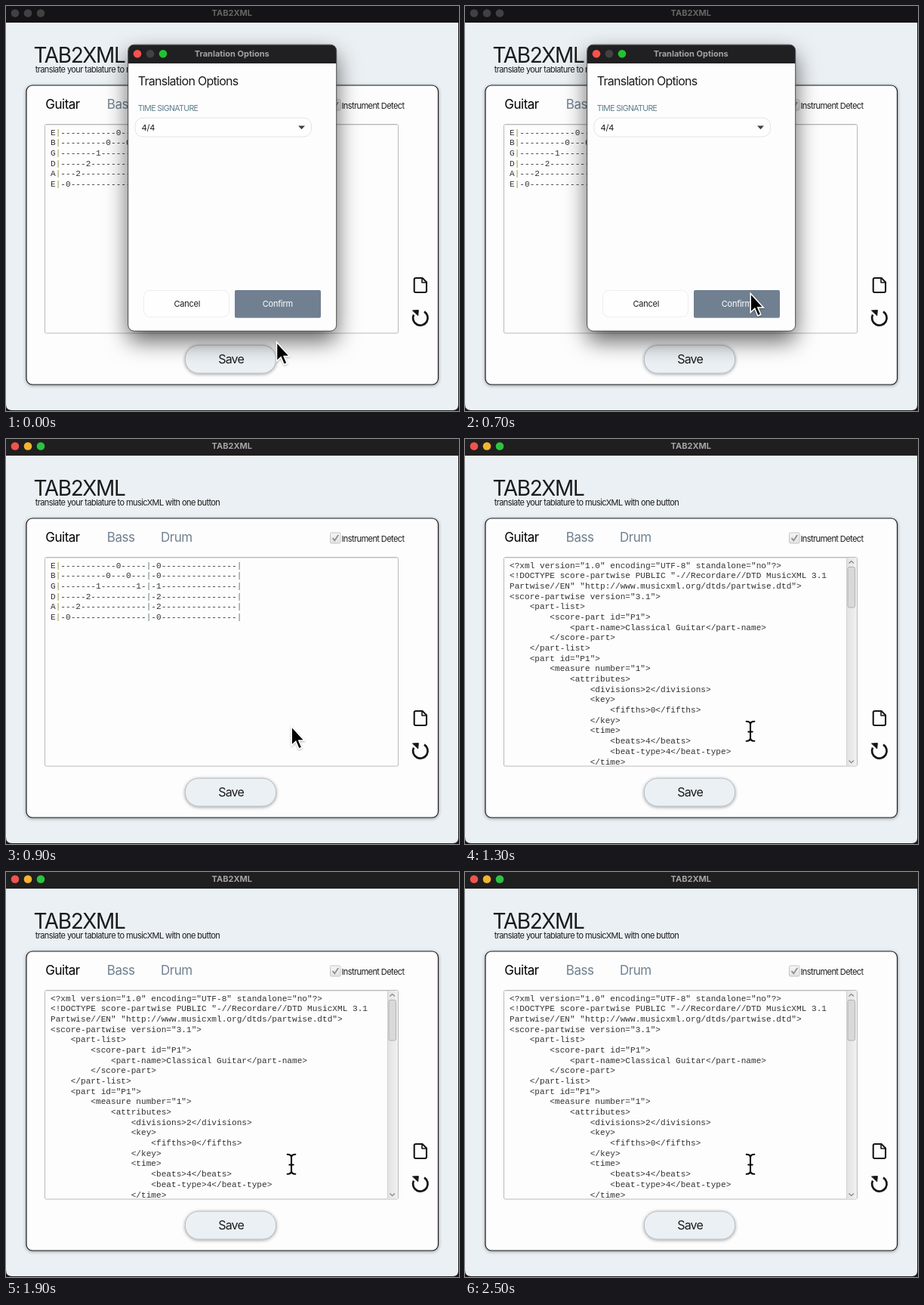
Recreate the animation shown at these times as an HTML page. Size 600 by 536 pixels, loop 2.6 s.

```html
<!DOCTYPE html>
<html lang="en">
<head>
<meta charset="utf-8">
<title>TAB2XML</title>
<style>
  html, body { margin: 0; width: 100%; height: 100%; overflow: hidden; background: #1b1a1b; }
  svg { display: block; width: 100vw; height: 100vh; }
  text { font-family: Inter, "Open Sans", sans-serif; fill: #1a1b1c; white-space: pre; }
  .bar { font-size: 11px; font-weight: 700; text-anchor: middle; fill: #a5a3a5; }
  .title { font-size: 28px; letter-spacing: -1.4px; }
  .small { font-size: 11px; letter-spacing: -.58px; }
  .tab { font-size: 17px; letter-spacing: -.5px; }
  .head { font-size: 16px; letter-spacing: -.72px; }
  .label { font-size: 10.5px; letter-spacing: -.58px; fill: #5d7c89; }
  .button { font-size: 11px; letter-spacing: -.25px; }
  .muted { fill: #708090; }
  .code text { font: 11.11px "Liberation Mono", "Courier New", monospace; fill: #333; }
</style>
</head>
<body>
<svg viewBox="0 0 600 536" preserveAspectRatio="none">
  <defs>
    <filter id="deep" x="-40%" y="-30%" width="180%" height="170%">
      <feDropShadow dx="0" dy="13" stdDeviation="15" flood-color="#000" flood-opacity=".62"/>
    </filter>
    <filter id="soft" x="-20%" y="-30%" width="140%" height="170%">
      <feDropShadow dx="0" dy="1" stdDeviation="2.2" flood-color="#000" flood-opacity=".38"/>
    </filter>
    <filter id="tiny" x="-30%" y="-30%" width="170%" height="170%">
      <feDropShadow dx="0" dy="1" stdDeviation="1" flood-color="#000" flood-opacity=".35"/>
    </filter>
    <linearGradient id="check" x1="0" y1="0" x2="0" y2="1">
      <stop offset="0" stop-color="#f6f6f6"/><stop offset="1" stop-color="#e2e2e3"/>
    </linearGradient>
    <linearGradient id="track">
      <stop offset="0" stop-color="#e2e2e3"/><stop offset="1" stop-color="#f0f0f1"/>
    </linearGradient>
    <clipPath id="pane"><rect x="52" y="157" width="467" height="275"/></clipPath>
  </defs>

  <!-- main window -->
  <rect width="600" height="536" fill="#1b1a1b"/>
  <path d="M0 21H599V528Q599 535 592 535H8Q0 535 0 527Z" fill="#ebf0f4"/>
  <rect id="topbar" width="600" height="22"/>
  <g id="lights"></g>
  <text id="caption" class="bar" x="299.3" y="13">TAB2XML</text>

  <text class="title" x="36.5" y="74.5">TAB2XML</text>
  <text class="small" x="38.7" y="88">translate your tablature to musicXML with one button</text>

  <rect x="27" y="105" width="545.5" height="396" rx="8" fill="#fdfdfe" stroke="#1d1f21" stroke-width="1.2" filter="url(#soft)"/>
  <text class="tab" x="52.3" y="136.3" style="fill:#000">Guitar</text>
  <text class="tab muted" x="133.8" y="136.3">Bass</text>
  <text class="tab muted" x="205" y="136.3">Drum</text>
  <rect x="429.5" y="124" width="13.5" height="14" rx="1.5" fill="url(#check)" stroke="#c3c4c5"/>
  <path d="M432.5 131L435.3 134.4L440.2 127" fill="none" stroke="#898a8b" stroke-width="1.7"/>
  <text class="small" x="444.5" y="136">Instrument Detect</text>

  <rect x="51.5" y="156.5" width="468" height="276.5" rx="2" fill="#fdfdfe" stroke="#b9babb"/>
  <path d="M52 157.5H519" stroke="#dfe0e1"/>
  <g class="code" clip-path="url(#pane)">
    <g id="tablature"></g>
    <g id="xml"></g>
  </g>
  <g id="scrollbar">
    <rect x="505" y="157" width="14" height="275.5" fill="url(#track)"/>
    <path d="M505.5 157V432" stroke="#d0d0d1"/>
    <rect x="507" y="169.5" width="9.5" height="53.5" rx="2" fill="#d9d9da" stroke="#b2b2b3"/>
    <path d="M508.5 164.5L511.7 161.5L515 164.5M508.5 425.5L511.7 428.5L515 425.5" fill="none" stroke="#858586" stroke-width="1.2"/>
  </g>

  <g fill="none" stroke="#151515" stroke-width="2.1" stroke-linejoin="round">
    <path d="M543 360H551.5L557 365.5V377Q557 379 555 379H542.7Q540.7 379 540.7 377V362Q540.7 360 543 360Z"/>
    <path d="M551 360.5V366H556.5" stroke-width="1.6"/>
    <path d="M554 404.5A9.8 9.8 0 1 1 540 408.5" stroke-width="2.7"/>
    <path d="M538.5 403L546.3 402.6L545.7 409.8Z" fill="#151515" stroke-width="1"/>
  </g>

  <rect x="237.3" y="449" width="120.4" height="37" rx="18" fill="#ebf0f4" stroke="#b4b9bd" filter="url(#soft)"/>
  <text class="head" x="281.2" y="473" style="letter-spacing:-.8px">Save</text>

  <!-- options dialog -->
  <g id="dialog">
    <rect x="162" y="51.5" width="275.5" height="378.5" rx="8" fill="#fdfdfe" filter="url(#deep)"/>
    <path d="M162 76V59.5Q162 51.5 170 51.5H429.5Q437.5 51.5 437.5 59.5V76Z" fill="#201f21"/>
    <rect x="161.7" y="51.2" width="276" height="379" rx="8" fill="none" stroke="#3b3c3e" stroke-width=".9"/>
    <circle cx="174" cy="63.3" r="5.3" fill="#fb514d"/>
    <circle cx="191" cy="63.3" r="5.3" fill="#434144"/>
    <circle cx="208" cy="63.3" r="5.3" fill="#22c232"/>
    <text class="bar" x="299.2" y="67">Tranlation Options</text>
    <text class="head" x="174.7" y="104.7">Translation Options</text>
    <text class="label" x="174.8" y="138.5">TIME SIGNATURE</text>
    <rect x="171" y="148" width="233.5" height="25" rx="10" fill="#fefefe" stroke="#e0e5e9"/>
    <text class="button" x="179.6" y="164.5">4/4</text>
    <path d="M387 158.5H396L391.5 163.3Z" fill="#3f4041"/>
    <rect x="182.5" y="376.5" width="113" height="35" rx="8" fill="#fefefe" stroke="#ebeef1"/>
    <text class="button" x="222.5" y="398">Cancel</text>
    <rect x="303" y="376" width="114" height="36.7" rx="2" fill="#708090"/>
    <text class="button" x="339.8" y="398" style="fill:#fff">Confirm</text>
  </g>

  <g id="arrow" filter="url(#tiny)">
    <path d="M0 0V25L5.6 19.8L9.7 29.5L13.6 27.8L9.6 18.4H17Z" fill="#050505" stroke="#fff" stroke-width="1.5"/>
  </g>
  <g id="beam" fill="none" stroke-linecap="round">
    <path id="halo" d="M372.7 373.8Q378 373.8 378 378V395.5Q378 399.7 372.7 399.7M383.3 373.8Q378 373.8 378 378M378 395.5Q378 399.7 383.3 399.7M375.3 387.5H380.7" stroke="#fff" stroke-width="4"/>
    <use href="#halo" id="ink"/>
  </g>
</svg>
<script>
const LOOP = 2600, STEP = 100, CLOSE = 800, RESULT = 1000;
const $ = id => document.getElementById(id);

function add(parent, name, attrs, content = "") {
  const el = document.createElementNS("http://www.w3.org/2000/svg", name);
  for (const key in attrs) el.setAttribute(key, attrs[key]);
  el.textContent = content;
  return parent.appendChild(el);
}

const lineY = i => 170.6 + i * 13.68;
const LEFT = 59, CHAR = 6.667;

// string name, fret positions in the first bar, closing chord
const strings = [
  ["E", { 11: 0 }, 0], ["B", { 9: 0, 13: 0 }, 0], ["G", { 7: 1, 15: 1 }, 1],
  ["D", { 5: 2 }, 2], ["A", { 3: 2 }, 2], ["E", { 1: 0 }, 0]
];
strings.forEach(([name, notes, chord], i) => {
  const bar = Array.from({ length: 17 }, (_, k) => notes[k] ?? "-").join("");
  const y = lineY(i);
  const put = (col, s, fill) =>
    add($("tablature"), "text", { x: LEFT + col * CHAR, y, style: fill ? `fill:${fill}` : "" }, s);
  put(0, name);
  put(1, "|", "#98933a");
  put(2, bar);
  put(19, "|", "#587564");
  put(20, "-" + chord + "-".repeat(15));
  put(37, "|", "#666");
});

const xmlLines = `<?xml version="1.0" encoding="UTF-8" standalone="no"?>
<!DOCTYPE score-partwise PUBLIC "-//Recordare//DTD MusicXML 3.1
Partwise//EN" "http://www.musicxml.org/dtds/partwise.dtd">
<score-partwise version="3.1">
    <part-list>
        <score-part id="P1">
            <part-name>Classical Guitar</part-name>
        </score-part>
    </part-list>
    <part id="P1">
        <measure number="1">
            <attributes>
                <divisions>2</divisions>
                <key>
                    <fifths>0</fifths>
                </key>
                <time>
                    <beats>4</beats>
                    <beat-type>4</beat-type>
                </time>`.split("\n");
xmlLines.forEach((line, i) => {
  const code = line.trimStart();
  add($("xml"), "text", { x: LEFT + (line.length - code.length) * CHAR, y: lineY(i) }, code);
});

const lights = ["#ef5450", "#f4b42f", "#2bc440"].map((color, i) =>
  ({ color, el: add($("lights"), "circle", { cx: 12 + 17 * i, cy: 9.5, r: 5.3 }) }));

// <use> inherits only what its path leaves unset, so the ink is a recoloured copy
const ink = $("halo").cloneNode();
ink.removeAttribute("id");
ink.setAttribute("stroke", "#080808");
ink.setAttribute("stroke-width", "2.1");
$("ink").replaceWith(ink);

const show = (id, on) => $(id).setAttribute("display", on ? "inline" : "none");

function draw(ms) {
  const t = Math.floor((ms % LOOP) / STEP) * STEP;
  const open = t < CLOSE, done = t >= RESULT;

  show("dialog", open);
  show("tablature", !done);
  show("xml", done);
  show("scrollbar", done);
  show("arrow", !done);
  show("beam", done);

  $("topbar").setAttribute("fill", open ? "#141315" : "#201f20");
  $("caption").style.fill = open ? "#666467" : "#a5a3a5";
  lights.forEach(({ el, color }) => el.setAttribute("fill", open ? "#414043" : color));

  const p = Math.min(t / 400, 1), ease = 1 - (1 - p) ** 2;
  const x = 358.5 + 20.5 * ease - (t >= 700 ? 0.8 : 0);
  const y = 445 - 65 * ease + (t >= 700 ? 0.5 : 0);
  $("arrow").setAttribute("transform", `translate(${x} ${y})`);
}

const start = performance.now();
function tick() {
  draw(performance.now() - start);
  requestAnimationFrame(tick);
}
tick();
</script>
</body>
</html>
```
